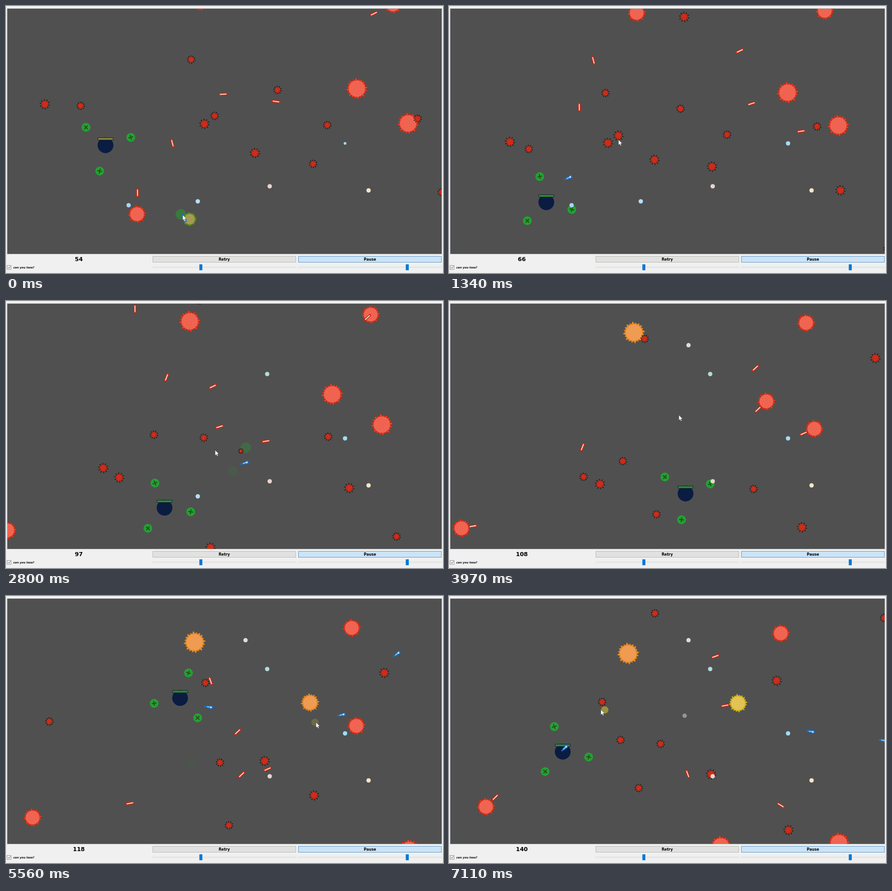
Recreate the animation shown at these times as an HTML page with a canvas. Size 957 by 585 pixels, loop 7.15 s.

```html
<!DOCTYPE html>
<html lang="en">
<head>
<meta charset="utf-8">
<title>Virus shooter</title>
<style>
  html, body { margin: 0; width: 100%; height: 100%; overflow: hidden; background: #f0f0f0; }
  svg, canvas { position: absolute; left: 0; top: 0; }
  canvas { left: 3px; top: 6px; }
  text { font: bold 8px "DejaVu Sans", sans-serif; text-anchor: middle; }
  .track { fill: #e7eaea; stroke: #dcdcdc; stroke-width: .6; }
  .thumb { fill: #0078d7; }
</style>
</head>
<body>
<svg width="957" height="585">
  <path d="M2.5 544V5.5H954.5V543.5H2.5" fill="none" stroke="#b4b8ba"/>
  <text id="score" x="159.5" y="559.3" style="font-size:12.5px">54</text>
  <rect x="321.5" y="548.5" width="313" height="13" fill="#e1e1e1" stroke="#b8b8b0"/>
  <text x="478" y="558">Retry</text>
  <rect x="640.5" y="548.5" width="313" height="13" fill="#cce4f7" stroke="#5b96c6"/>
  <text x="797" y="558">Pause</text>
  <rect class="track" x="321.5" y="571" width="314" height="2.5"/>
  <rect class="track" x="640.5" y="571" width="314" height="2.5"/>
  <rect class="thumb" x="423.5" y="566" width="6.5" height="13"/>
  <rect class="thumb" x="875.5" y="566" width="6.5" height="13"/>
  <rect x="2.5" y="568.5" width="8.5" height="8.5" fill="#fff" stroke="#888"/>
  <path d="M4.3 572.8l2 2 3.2-4.4" fill="none" stroke="#333"/>
  <text x="16" y="575.2" style="font-size:6.05px;font-style:italic;text-anchor:start">can you lose?</text>
</svg>
<canvas id="field" width="951" height="537"></canvas>
<script>
const LOOP = 7150, START = -2500, STEP = 10, TAU = Math.PI * 2, END = 9e3;
const c = document.getElementById('field').getContext('2d');
const score = document.getElementById('score');

// Waypoints: time, then values
const playerPath = [
  [-2465, 481, 193], [-1427, 343, 220], [-390, 286, 268], [0, 218, 305], [700, 150, 380],
  [1340, 213, 430], [2070, 292, 426], [2800, 347, 453], [3385, 445, 402], [3970, 518, 422],
  [4405, 525, 364], [4840, 492, 310], [5535, 385, 224], [6230, 285, 211], [6670, 228, 280], [7110, 249, 341]
];
const cursorPath = [
  [-690, 387, 458], [0, 387, 458], [1340, 371, 293], [2070, 500, 362], [2800, 458, 327],
  [3970, 503, 250], [4300, 640, 290], [4840, 666, 275], [6230, 691, 279], [7110, 333, 249]
];
const scorePath = [[0, 54], [1340, 66], [2800, 97], [3970, 108], [4840, 113], [6230, 123], [7110, 140]];

function along(path, t) {
  let i = 0;
  while (i < path.length - 2 && t > path[i + 1][0]) i++;
  const [a, b] = [path[i], path[i + 1]], k = (t - a[0]) / (b[0] - a[0]);
  return a.slice(1).map((v, n) => v + (b[n + 1] - v) * k);
}

const heading = ([x, y], [tx, ty]) => Math.atan2(ty - y, tx - x);
const ahead = ([x, y], a, d) => [x + Math.cos(a) * d, y + Math.sin(a) * d];

// Pursues the player, passing through x, y at the given time
function hunter(speed, [x, y, time, death = END, ...hits]) {
  const trail = [], slot = t => Math.round((t - START) / STEP);
  for (const dt of [STEP, -STEP]) {
    let p = [x, y];
    for (let t = time; t >= START && t <= LOOP; t += dt) {
      trail[slot(t)] = p;
      p = ahead(p, heading(p, along(playerPath, t)), speed * dt);
    }
  }
  return { death, hits, at: t => trail[slot(t)] };
}

// x, y, time there, death, hits taken
const giants = [
  [287, 456, 0, 700], [695, 220, 3970, END, 4950, 5930], [405, 69, 3970, END, 3300],
  [782, 48, 3970], [800, 280, 3970, 6450, 5930], [610, 560, 6230],
  [871, 549, 6230], [45, 493, 4840], [402, 467, 0, 150, -900, -500, -60]
].map(row => hunter(.0212, row));

const seekers = [
  [609, 282, 1340, 2920], [213, 366, 2800, 5300], [248, 387, 2800, 5500], [324, 293, 2800, 4990],
  [348, 300, 1340, 1900], [371, 284, 1340, 2100], [507, 225, 1340, 3300], [450, 337, 1340, 2000],
  [576, 352, 1340, 2780], [806, 264, 1340, 3200], [515, 24, 1340, 2300],
  [667, 412, 3970], [773, 496, 3970], [447, 143, 4840], [484, 414, 4840], [879, 156, 4840],
  [43, 277, 4840, 6700], [465, 460, 6230], [801, 540, 6230], [451, 38, 7110], [953, 48, 7110]
].map(row => hunter(.0725, row));

// Giants take turns in three groups, aiming at the player
const rods = [];
giants.forEach((g, i) => {
  for (let t = -3501 + 1037 * (i % 3); t < LOOP; t += 3111) {
    if (t < START || t > g.death) continue;
    const from = g.at(t), [x, y] = from;
    if (x > -27 && x < 984 && y > -24 && y < 573)
      rods.push({ t, from, angle: heading(from, along(playerPath, t)) });
  }
});

// Each click shoots from the player towards the cursor
const shots = [-690, 1100, 2070, 4300, 4815, 5430, 5760, 7090].map(t => {
  const from = along(playerPath, t), to = along(cursorPath, t);
  return { t, from, to, angle: heading(from, to) };
});

const bursts = seekers.filter(s => s.death < END)
  .map(s => ({ t: s.death - 300, to: s.at(s.death - 300) }));
giants.forEach((g, i) => g.hits.forEach(t =>
  bursts.push({ t, to: ahead(g.at(t), .78 + .36 * i, 23) })));

// x, y, colour, birth, death
const pellets = [
  [742.5, 301, '#9fdcf6', -250, END], [268.5, 436.5, '#a4d6f6', -900, 1700],
  [420, 428, '#b6dff6', -900, 3300], [577.5, 395, '#e9d4d0', -900, END],
  [794, 404, '#f2e6c6', -900, END], [572, 160, '#b6dad8', 2200, END],
  [524.5, 96.8, '#dcdcdc', 3500, END], [516, 262.3, '#8ccdec', 5600, 6700],
  [516, 262.3, '#8f979c', 6300, END]
];

// Fill and edge, by number of hits taken
const skins = [['#f0614f', '#cc2a10'], ['#ef9a50', '#d97f14'], ['#e3c252', '#c0ac10'], ['#9f9850', '#629018']];

function disc(x, y, r, fill) {
  c.fillStyle = fill;
  c.beginPath();
  c.arc(x, y, r, 0, TAU);
  c.fill();
}

function line(x1, y1, x2, y2, width, color) {
  c.strokeStyle = color;
  c.lineWidth = width;
  c.beginPath();
  c.moveTo(x1, y1);
  c.lineTo(x2, y2);
  c.stroke();
}

function polygon(pts, fill, stroke, width = 1) {
  c.beginPath();
  pts.forEach(p => c.lineTo(...p));
  c.closePath();
  c.fillStyle = fill;
  c.fill();
  c.strokeStyle = stroke;
  c.lineWidth = width;
  if (stroke) c.stroke();
}

function place([x, y], angle, draw) {
  c.save();
  c.translate(x, y);
  c.rotate(angle);
  draw();
  c.restore();
}

function speckle(count, r, color, size) {
  c.fillStyle = color;
  for (let i = 1; i <= count; i++) {
    const [x, y] = ahead([0, 0], i * 2.39996, r * Math.sqrt((i - .5) / count));
    c.fillRect(x - size / 2, y - size / 2, size, size);
  }
}

function giant(r, [fill, edge]) {
  const rim = Array.from({ length: 40 }, (_, i) =>
    ahead([0, 0], i * TAU / 40, i % 2 ? r * .82 : r * (1 + .06 * Math.sin(i * 5))));
  polygon(rim, fill, edge, 1.2);
  c.strokeStyle = edge;
  c.beginPath();
  c.arc(0, 0, r * .84, 0, TAU);
  c.stroke();
  c.globalAlpha = .4;
  speckle(45, r * .76, '#ffd0b0', 1);
}

function seeker(r) {
  for (let i = 0; i < 10; i++) {
    c.rotate(TAU / 10);
    line(r * .6, 0, r, 0, 1, '#181210');
    line(r, -1.1, r, 1.1, 1.2, '#181210');
  }
  disc(0, 0, r * .8, '#721b10');
  disc(0, 0, r * .72, '#cf2b19');
  speckle(16, r * .65, '#861a10', 1);
  speckle(7, r * .5, '#f25a38', 1);
}

function rod() {
  c.lineCap = 'round';
  line(-7, 0, 7, 0, 5.4, '#cb2413');
  line(-6.3, 0, 6.3, 0, 2.3, '#f2d3c0');
}

function shot() {
  polygon([[-9.5, -1], [4, -3.5], [9, -3.2], [9, 3.2], [4, 3.5], [-9.5, 1]], '#1672d0');
  line(-4, 0, 5, 0, 2, '#8cc8f2');
  disc(5, 0, 2, '#c4e4fa');
}

// Hunters swell in turn and shrink away when they die
function drawHunters(list, t, small, big, draw) {
  list.forEach((h, i) => {
    if (t > h.death) return;
    const r = Math.sin(t * .004 + i * 2) > .2 ? big : small;
    place(h.at(t), .2, () => draw(r * Math.min(1, (h.death - t) / 200), h));
  });
}

function fly(list, speed, life, t, draw) {
  for (const { t: birth, from, angle } of list) {
    const age = t - birth;
    if (age > 0 && age < life) place(ahead(from, angle, speed * age), angle, draw);
  }
}

function flash(list, life, t, r, color) {
  for (const { t: birth, to } of list) {
    const age = t - birth;
    if (age < 0 || age > life) continue;
    c.globalAlpha = .85 * (1 - age / life);
    disc(...to, r, color);
    c.globalAlpha = 1;
  }
}

function drawPlayer(t) {
  const [x, y] = along(playerPath, t);
  disc(x, y, 17.3, '#0b1c42');
  c.fillStyle = '#172026';
  c.fillRect(x - 17, y - 17, 34, 6);
  c.fillStyle = t < 300 ? '#8a8338' : '#2b8a3a';
  c.fillRect(x - 16, y - 16, 32, 4);

  for (let i = 0; i < 3; i++) {
    const a = (103 - .3335 * t + i * 120) * TAU / 360;
    place(ahead([x, y], a, 58), a, () => {
      disc(0, 0, 9.6, '#22a232');
      line(-5.5, 0, 5.5, 0, 2.4, '#28511f');
      line(0, -5.5, 0, 5.5, 2.4, '#28511f');
    });
  }
}

function drawCursor(t) {
  place(along(cursorPath, t), 0, () => polygon(
    [[0, 0], [0, 11.5], [2.7, 9.2], [4.6, 13.2], [6.4, 12.3], [4.6, 8.4], [8.2, 8.2]],
    '#fff', '#333', .5));
}

function frame(now) {
  const t = now % LOOP;
  c.setTransform(1, 0, 0, 1, -3, -6);
  c.fillStyle = '#505050';
  c.fillRect(0, 0, 957, 585);

  flash(bursts, 400, t, 11.5, '#32883a');
  drawHunters(giants, t, 19, 22.5, (r, g) =>
    giant(r, skins[g.hits.filter(hit => hit < t).length]));
  drawHunters(seekers, t, 8.5, 10.5, seeker);
  fly(rods, .14, 3250, t, rod);
  drawPlayer(t);
  fly(shots, .33, 1690, t, shot);
  for (const [x, y, color, birth, death] of pellets)
    if (t > birth && t < death) disc(x, y, Math.min(4.8, (t - birth) * .012), color);
  flash(shots, 200, t, 8, '#b3a534');
  drawCursor(t);

  score.textContent = Math.floor(along(scorePath, t)[0] + .01);
  requestAnimationFrame(frame);
}
requestAnimationFrame(frame);
</script>
</body>
</html>
```
